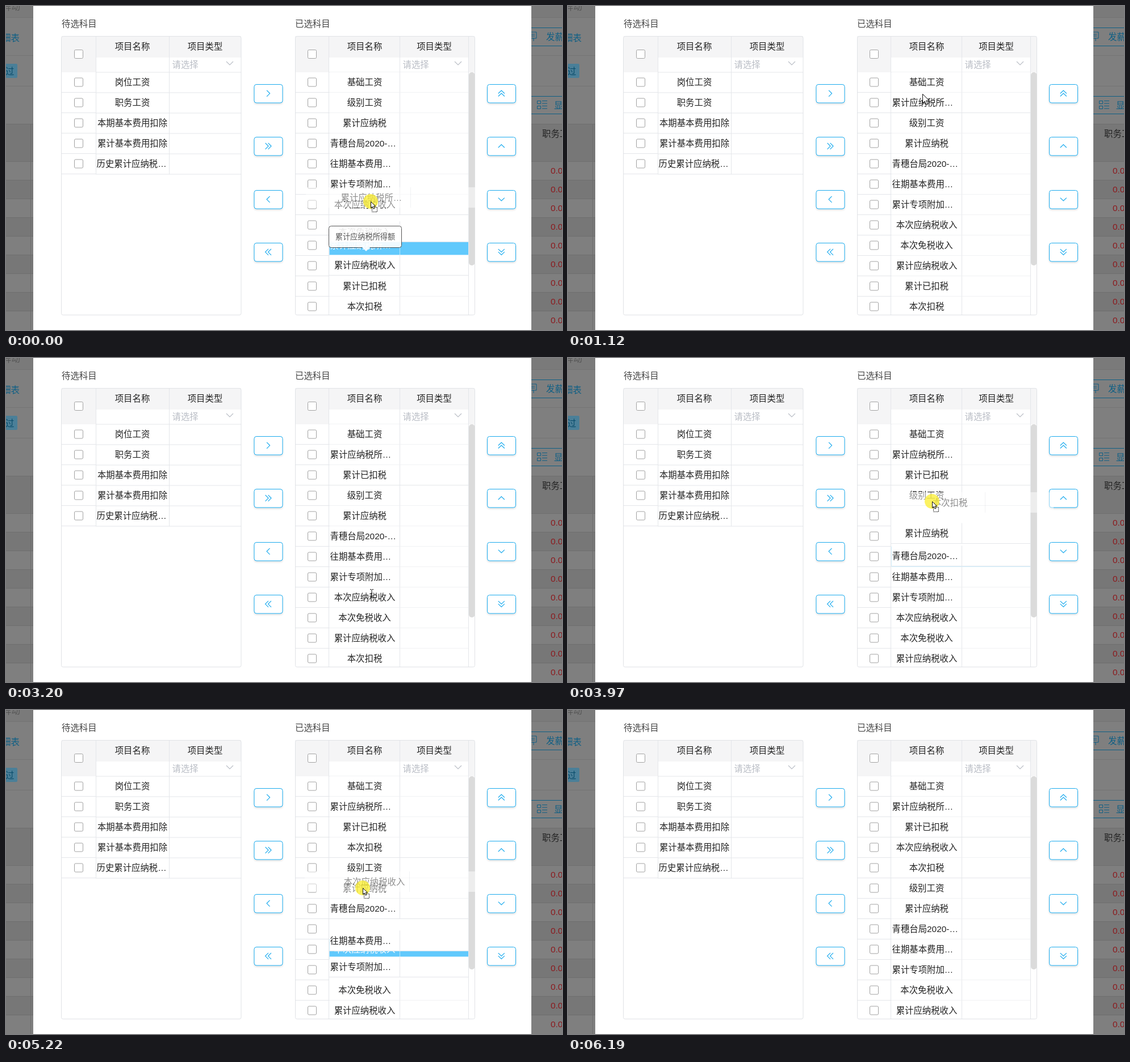
These frames come from a looping animation (979x572 px, 7.41 s). An HTML page:

```html
<!DOCTYPE html>
<html lang="zh-CN">
<head>
<meta charset="utf-8">
<title>待选科目</title>
<style>
html, body { margin: 0; width: 100%; height: 100%; overflow: hidden; background: #fff; }
svg { display: block; width: 979px; height: 572px; }
text { font: 300 15.4px "Liberation Sans", "Noto Sans CJK SC", "Noto Sans CJK", sans-serif; fill: #222; }
</style>
</head>
<body>
<svg id="stage" viewBox="0 0 979 572">
  <defs>
    <clipPath id="body"><rect x="509" y="117" width="306" height="428"/></clipPath>
    <filter id="soft" x="-20%" y="-20%" width="140%" height="160%">
      <feDropShadow dx="0" dy="2" stdDeviation="1.5" flood-color="#000" flood-opacity=".12"/>
    </filter>
  </defs>
  <g id="page"></g>
  <g id="rows" clip-path="url(#body)"></g>
  <g id="frame"></g>
  <g id="drag"></g>
</svg>
<script>
const LOOP = 7410, ROW = 36, TOP = 134.5, BLUE = '#61c9fc', ACCENT = '#1cabee', EDGE = '#e4e6ea';
const NS = 'http://www.w3.org/2000/svg';
const $ = id => document.getElementById(id);
const rowY = k => TOP + ROW * k;

function add(parent, tag, attrs, content) {
  const el = document.createElementNS(NS, tag);
  for (const a in attrs) el.setAttribute(a, attrs[a]);
  if (content) el.textContent = content;
  parent.appendChild(el);
  return el;
}
const rect = (g, x, y, w, h, fill, more) => add(g, 'rect', { x, y, width: w, height: h, fill, ...more });
const path = (g, d, stroke, more) => add(g, 'path', { d, stroke, fill: 'none', ...more });
const hline = (g, x1, x2, y, c = EDGE) => path(g, `M${x1} ${y}H${x2}`, c);
const vline = (g, x, y1, y2, c = EDGE) => path(g, `M${x} ${y1}V${y2}`, c);
// Text is placed by its visual middle line.
const label = (g, s, x, cy, fill = '#222', anchor = 'start', more) =>
  add(g, 'text', { x, y: cy + 5.6, style: `fill:${fill}`, 'text-anchor': anchor, ...more }, s);
// Clipped names start at the cell edge, short ones are centred.
const cellText = (g, s, left, mid, cy, fill) =>
  s.endsWith('…') ? label(g, s, left, cy, fill) : label(g, s, mid, cy, fill, 'middle');

// ---- dimmed page behind the dialog ----
function drawPage(g) {
  rect(g, 0, 0, 979, 572, '#7f7f7f');
  rect(g, 0, 0, 979, 20, '#7a7a7a');
  for (const y of [20.5, 87.5, 141.5]) hline(g, 0, 979, y, '#747474');
  rect(g, 0, 208, 979, 66, '#777');
  for (let k = 0; k < 9; k++) {
    const y = 274 + 33 * k;
    if (k % 2) rect(g, 0, y, 979, 33, '#777');
    hline(g, 0, 979, y + .5, '#6e6e6e');
    label(g, '0.00', 959, y + 16, '#8c1a1e');
  }
  hline(g, 0, 979, 208.5, '#6e6e6e');
  vline(g, 43.5, 208, 572, '#6e6e6e');
  const dim = '#0e5f85';
  label(g, '异动', -6, 1, '#555');
  label(g, '细表', -7, 56, dim);
  rect(g, -4, 102, 24, 25, '#4a7f98', { rx: 2 });
  label(g, '过', -1, 115, '#0a4c6b');
  rect(g, 900.5, 38.5, 100, 32, 'none', { stroke: dim });
  path(g, 'M923 46H934V57H928M924 57H929V62M925 50H931M925 53H931', dim);
  label(g, '发薪', 951, 54, dim);
  rect(g, 900.5, 159.5, 100, 31, 'none', { stroke: dim });
  path(g, 'M935.5 167.5h6v5h-6zM935.5 176.5h6v5h-6zM944 167.5h9M944 172h9M944 176.5h9M944 181h9', dim);
  label(g, '显', 965, 175, dim);
  label(g, '职务工资', 944, 225, '#222');
  rect(g, 48, 0, 877, 572, '#fff');
}

const box = (g, x, y) => rect(g, x - 7.5, y - 7.5, 15, 15, '#fff', { rx: 2, stroke: '#a2a2a2' });

function drawTable(g, t) {
  const { x, col, sep, end, right, count } = t;
  label(g, t.title, x, 31, '#444');
  rect(g, x, 53, col - x, 64, '#f5f5f6');
  rect(g, col, 53, right - col, 38, '#f5f5f6');
  if (right > end) rect(g, end, 53, right - end, 64, '#f5f5f6');
  vline(g, col + .5, 53, count < 12 ? 297 : 545);
  vline(g, sep + .5, 53, count < 12 ? 297 : 117);
  hline(g, col, end, 117);
  label(g, '项目名称', t.mid, 71.5, '#222', 'middle');
  label(g, '项目类型', t.mid2, 71.5, '#222', 'middle');
  label(g, '请选择', sep + 5.5, 103, '#b9bdc5');
  path(g, `M${t.arrow - 6} 98l6 6l6 -6`, '#b9bdc5', { 'stroke-width': 1.1 });
  box(g, x + 30, 85);
  for (let k = 0; k < count; k++) {
    box(g, x + 30, rowY(k));
    if (k < 11) hline(g, x, col, 152.5 + ROW * k);
  }
}

const rightTable = { title: '已选科目', x: 509, col: 568, sep: 693, end: 814, right: 825, mid: 631.5, mid2: 754, arrow: 796, count: 12 };
const leftTable = { title: '待选科目', x: 98, col: 158, sep: 287, end: 414, right: 414, mid: 222.5, mid2: 350.5, arrow: 394, count: 5 };

drawPage($('page'));
drawTable($('page'), leftTable);
drawTable($('page'), rightTable);
['岗位工资', '职务工资', '本期基本费用扣除', '累计基本费用扣除', '历史累计应纳税…'].forEach((s, k) => {
  cellText($('page'), s, 159.5, 222.5, rowY(k));
  hline($('page'), 158, 414, 152.5 + ROW * k + .5);
});

// ---- borders, scroll bar and buttons ----
const frame = $('frame');
rect(frame, 97.5, 53.5, 316.5, 492, 'none', { rx: 3, stroke: '#e0e2e6' });
rect(frame, 509.5, 53.5, 316, 492, 'none', { rx: 3, stroke: '#e0e2e6' });
vline(frame, 814.5, 53, 545);
rect(frame, 815, 117, 10.5, 341, '#dbdbdb', { rx: 5 });

function button(x, y, angle, twin) {
  rect(frame, x + .5, y + .5, 50, 32.5, '#fff', { rx: 4, stroke: ACCENT, filter: 'url(#soft)' });
  const g = add(frame, 'g', { transform: `translate(${x + 25.3} ${y + 16.3}) rotate(${angle})` });
  for (const dx of twin ? [-2.5, 2.5] : [0])
    path(g, `M${dx - 2.7} -5.5l5.4 5.5l-5.4 5.5`, ACCENT, { 'stroke-width': 1.2 });
}
[[0, 0], [0, 1], [180, 0], [180, 1]].forEach(([a, twin], k) => button(436.5, Math.round(138 + 93.4 * k), a, twin));
[[-90, 1], [-90, 0], [90, 0], [90, 1]].forEach(([a, twin], k) => button(847, Math.round(138 + 93.4 * k), a, twin));

// ---- sortable rows ----
const names = ['基础工资', '级别工资', '累计应纳税', '青穗台局2020-…', '往期基本费用…', '累计专项附加…',
  '本次应纳税收入', '本次免税收入', '累计应纳税收入', '累计应纳税所…', '累计已扣税', '本次扣税'];

function makeRow(parent, name, blue) {
  const g = add(parent, 'g');
  rect(g, 569.5, -18, 244.5, 36, blue ? BLUE : '#fff');
  vline(g, 693.5, -18, 18, blue ? '#b5e5fd' : EDGE);
  if (!blue) hline(g, 569, 814, 18);
  cellText(g, name, 570.5, 631.5, 0, blue ? '#fff' : '#222');
  return g;
}
const blueRows = names.map(n => makeRow($('rows'), n, true));
const rows = names.map(n => makeRow($('rows'), n));
const layer = $('drag');
const ghosts = names.map(n => {
  const g = add(layer, 'g', { opacity: .5 });
  rect(g, 509, -18, 305, 36, '#fff');
  vline(g, 693.5, -18, 18);
  cellText(g, n, 570.5, 631.5, 0);
  return g;
});

// hops: [time, slot]; hold: ghost offset from the pointer; lag: delay of the blue row.
const drags = [
  { grab: -400, drop: 1020, from: 9, lag: 60, hold: [-623, -7],
    hops: [[-165, 8], [-36, 7], [90, 6], [180, 5], [270, 4], [370, 3], [460, 2], [560, 1]] },
  { grab: 1860, drop: 2980, from: 10, lag: 100, hold: [-613, 6],
    hops: [[1920, 9], [1970, 8], [2020, 7], [2080, 6], [2150, 5], [2280, 3], [2440, 2]] },
  { grab: 3610, drop: 4370, from: 11, lag: 180, hold: [-600, 2],
    hops: [[3630, 10], [3660, 9], [3690, 8], [3730, 7], [3760, 6], [3805, 5], [3845, 4], [4060, 3]] },
  { grab: 5090, drop: 5860, from: 9, lag: 100, hold: [-611, -11],
    hops: [[5095, 8], [5150, 7], [5320, 5], [5450, 4], [5600, 3]] }
];
let order = names.map((_, i) => i);
for (const d of drags) {
  d.order = order.slice();
  order.splice(d.hops.at(-1)[1], 0, order.splice(d.from, 1)[0]);
}
const finalOrder = order;

// ---- pointer ----
const trail = [[0, 642, 345], [70, 645, 335], [300, 668, 270], [600, 634, 175], [730, 622, 160], [1020, 622, 160],
  [1120, 624, 155], [1300, 622, 205], [1600, 616, 440], [1750, 613, 488], [1860, 613, 488], [2100, 640, 360],
  [2350, 668, 216], [2600, 664, 204], [2680, 654, 201], [2980, 654, 201], [3200, 644, 416], [3430, 600, 528],
  [3610, 600, 528], [3970, 641, 253], [4290, 640, 241], [4370, 640, 241], [4750, 625, 532], [5070, 611, 469],
  [5150, 618, 400], [5220, 628, 314], [5600, 645, 275], [5860, 640, 262], [5960, 645, 275], [6190, 820, 580]];

function pointerAt(t) {
  const i = trail.findIndex(p => p[0] > t);
  if (i < 0) return trail.at(-1).slice(1);
  const [a, x, y] = trail[i - 1], [b, u, v] = trail[i], p = (t - a) / (b - a);
  return [x + (u - x) * p, y + (v - y) * p];
}

const halo = add(layer, 'circle', { r: 13, fill: '#fbee2c', opacity: .75 });
const arrow = add(layer, 'path', { d: 'M.5 .5V16.5L4.3 13L6.8 18.8L9.3 17.7L6.8 12H12z', fill: '#fff', stroke: '#111' });
const beam = path(layer, 'M-3 -7.5H-1L0 -6.5L1 -7.5H3M0 -6.5V6.5M-3 7.5H-1L0 6.5L1 7.5H3', '#111');
const carry = add(layer, 'g');
rect(carry, 2.5, 10.5, 9, 8, '#fff', { stroke: '#111', 'stroke-dasharray': '1.5 1' });
add(carry, 'path', { d: 'M.5 .5V11.5L3.2 9.2L5 13.2L7 12.3L5.2 8.4H8.6z', fill: '#fff', stroke: '#111' });

const tip = add(layer, 'g');
rect(tip, 568.5, 388.5, 128, 38, '#fff', { rx: 4, stroke: '#444' });
add(tip, 'path', { d: 'M627 426H641L634 433z', fill: '#fff' });
label(tip, '累计应纳税所得额', 632.5, 406.6, '#444', 'middle', { style: 'font-size:13.2px;fill:#444' });

// ---- timing: runs of [first, last, steps] ----
const runs = [[70, 730, 9], [1020, 1120, 2], [1220, 1750, 8], [1860, 2350, 8], [2420, 2600, 3], [2680, 2680, 1],
  [2980, 3200, 4], [3300, 3430, 3], [3610, 3970, 6], [4050, 4290, 4], [4370, 5070, 10], [5150, 5220, 2],
  [5310, 5860, 8], [5960, 6190, 4]];

function snap(t) {
  const run = runs.filter(r => r[0] <= t).at(-1);
  if (!run) return 0;
  const [a, b, n] = run;
  if (t >= b) return b;
  const step = (b - a) / (n - 1);
  return a + Math.floor((t - a) / step) * step;
}

const clamp = x => Math.max(0, Math.min(1, x));
const ease = x => 1 - (1 - clamp(x)) ** 2;
const show = (el, on) => el.setAttribute('display', on ? 'inline' : 'none');
const move = (el, x, y) => el.setAttribute('transform', `translate(${x.toFixed(2)} ${y.toFixed(2)})`);

function render(time) {
  const t = snap(time);
  const drag = drags.find(d => t < d.drop);
  const held = drag && t >= drag.grab;
  const list = drag ? drag.order : finalOrder;
  const [px, py] = pointerAt(t);

  [...blueRows, ...ghosts].forEach(el => show(el, false));
  list.forEach((id, k) => {
    const lifted = held && k === drag.from;
    show(rows[id], !lifted);
    if (lifted) {
      const hop = drag.hops.filter(h => h[0] + drag.lag <= t).at(-1);
      show(blueRows[id], true);
      move(blueRows[id], 0, rowY(hop ? hop[1] : k));
      show(ghosts[id], true);
      move(ghosts[id], px + drag.hold[0], py + drag.hold[1]);
      return;
    }
    const pass = held && k < drag.from && drag.hops.find(h => h[1] <= k);
    move(rows[id], 0, rowY(k) + (pass ? ROW * ease((t - pass[0]) / 200) : 0));
  });

  const near = Math.abs(py - rowY(Math.round((py - TOP) / ROW))) < 10;
  const text = near && px > 575 && px < 685;
  const seen = t < 6190;
  show(halo, held);
  show(carry, held);
  show(beam, seen && !held && text);
  show(arrow, seen && !held && !text);
  for (const el of [halo, carry, beam, arrow]) move(el, px, py);
  show(tip, t < 150);
  tip.setAttribute('opacity', t < 70 ? .9 : .4);
}

const start = performance.now();
function tick() {
  render((performance.now() - start) % LOOP);
  requestAnimationFrame(tick);
}
tick();
</script>
</body>
</html>
```
